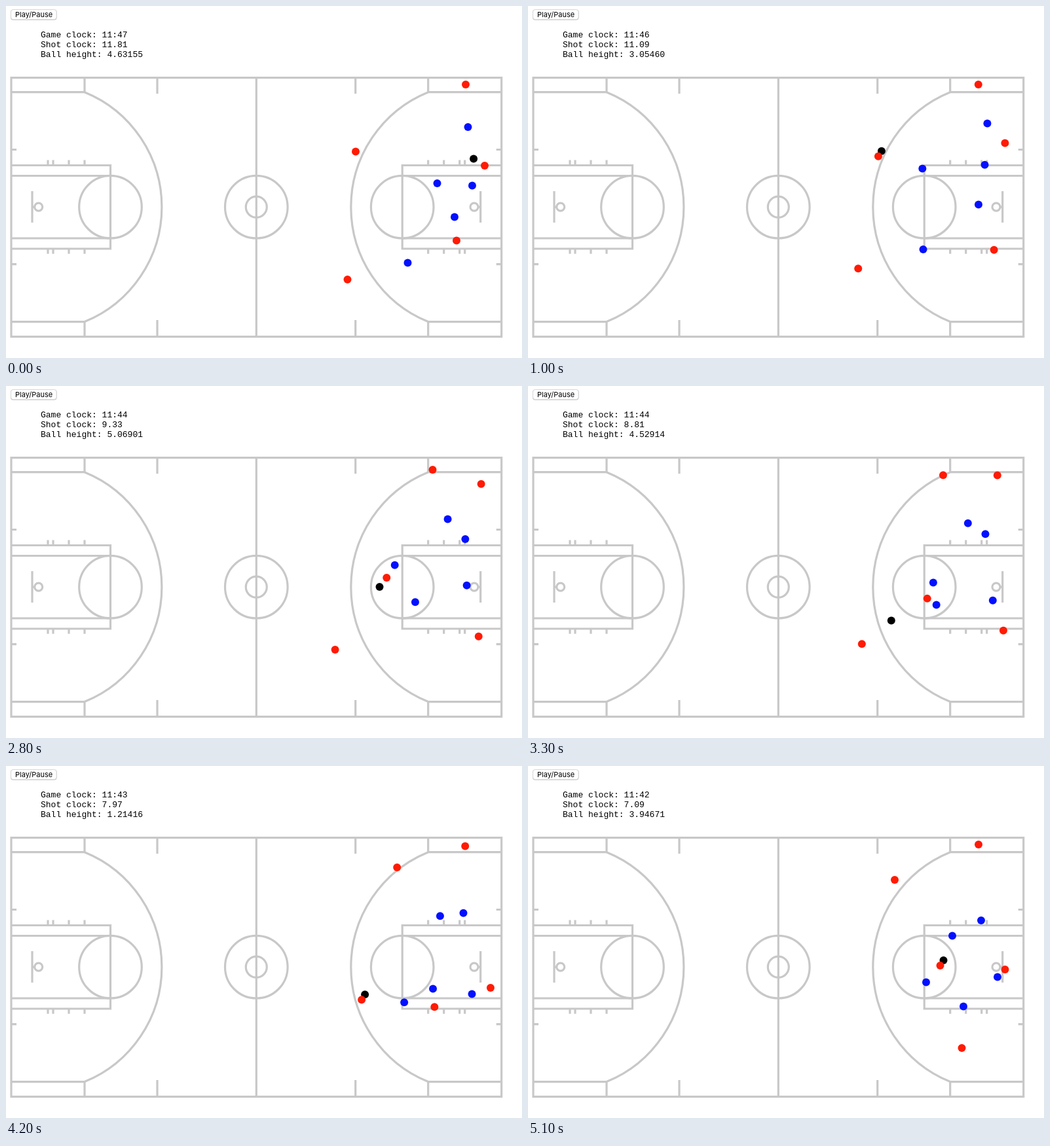
These frames come from a looping animation (788 px wide and 538 px high, 5.2 s). An HTML page:

```html
<!DOCTYPE html>
<html lang="en">
<head>
<meta charset="utf-8">
<title>Court tracking</title>
<style>
  html, body { margin: 0; width: 100%; height: 100%; overflow: hidden; background: #fff; }
  svg { display: block; width: 788px; height: 538px; }
  .court { fill: none; stroke: #c8c8c8; stroke-width: 3.2; }
  .button { font: 11px Inter, sans-serif; }
  .stats { font: 13px "Liberation Mono", "Courier New", monospace; white-space: pre; }
</style>
</head>
<body>
<svg viewBox="0 0 788 538">
  <g class="button">
    <rect x="7" y="5.6" width="70.5" height="16" rx="4" fill="#bdbdbd"/>
    <rect x="7.5" y="5.5" width="69.5" height="15" rx="3.5" fill="#fff" stroke="#d4d4d4" stroke-width=".8"/>
    <text x="14" y="17">Play/Pause</text>
  </g>
  <g class="stats">
    <text id="game" x="53" y="47.5"></text>
    <text id="shot" x="53" y="62.5"></text>
    <text id="height" x="53" y="77.5"></text>
  </g>
  <g class="court">
    <g id="half">
      <path d="M8 131.7H120V110M8 482.6H120V505M231 110V134M231 480V505"/>
      <path d="M120 131.7A189.5 189.5 0 0 1 120 482.6"/>
      <path d="M8 243.5H159.5V371H8M8 259.5H159.5M8 355H159.5"/>
      <g id="marks"><path d="M64 235.5v7.5m8 0v-7.5m24 0v7.5m24 0v-7.5M8 219.5h8"/></g>
      <use href="#marks" transform="matrix(1 0 0 -1 0 614.2)"/>
      <path d="M40 283V331M40 307.2H43.5"/>
      <circle cx="159.5" cy="307.2" r="47.8"/>
      <circle cx="49.7" cy="307.2" r="6"/>
    </g>
    <use href="#half" transform="matrix(-1 0 0 1 764.7 0)"/>
    <rect x="8" y="109.6" width="748.7" height="395.8"/>
    <path d="M382.3 110V505"/>
    <circle cx="382.3" cy="307.2" r="47.8"/>
    <circle cx="382.3" cy="307.2" r="16"/>
  </g>
  <g id="dots"></g>
</svg>
<script>
const LOOP = 5.2, STEP = 0.1, END = LOOP - STEP;
const $ = id => document.getElementById(id);
const clamp = u => Math.min(1, Math.max(0, u));
const mix = (a, b, u) => a + (b - a) * u;

// Catmull-Rom curve through values spread evenly over the play.
function spline(values) {
  const n = values.length - 1;
  const slope = i => i === 0 ? values[1] - values[0]
    : i === n ? values[n] - values[n - 1]
    : (values[i + 1] - values[i - 1]) / 2;
  return t => {
    const pos = t / END * n, i = Math.min(n - 1, Math.floor(pos));
    const u = pos - i, v = 1 - u;
    return v * v * ((1 + 2 * u) * values[i] + u * slope(i)) +
           u * u * ((1 + 2 * v) * values[i + 1] - v * slope(i + 1));
  };
}

function addDot(color, at) {
  const el = document.createElementNS('http://www.w3.org/2000/svg', 'circle');
  el.setAttribute('r', 6);
  el.setAttribute('fill', color);
  $('dots').append(el);
  return { el, at };
}

// A run is a few waypoints, reached at equal intervals.
function run(...points) {
  const x = spline(points.map(p => p[0])), y = spline(points.map(p => p[1]));
  return t => [x(t), y(t)];
}

const wing = run([702, 120], [659, 125], [560, 174]);
const guard = run([534, 222.5], [535, 230], [543, 237], [596, 312], [651, 361], [662.5, 431]);
const passer = run([731, 244], [728, 200], [728.5, 157], [707, 126], [688, 120]);
const center = run([688, 358.5], [712, 373], [723.5, 380], [722.5, 380], [740, 343], [728.5, 311]);
const driver = run([521.5, 418], [504, 401], [500, 402], [506, 400], [535, 363], [629.5, 305]);

const defenders = [
  run([705.5, 185], [699, 180], [677, 200], [668, 219], [648, 259.5]),
  run([658.5, 271], [592, 246], [586, 264], [643, 327], [665, 367.5]),
  run([712, 274.5], [697.5, 242.5], [709, 250], [699, 229], [699, 224], [692, 236]),
  run([685, 322.5], [688, 303], [688, 269], [708, 318], [711, 349], [717, 322.5]),
  run([613.5, 392.5], [603.5, 371.5], [614, 349], [626, 329], [609, 362], [608, 330.5])
];

// The ball stays beside its holder and goes passer > guard > driver.
function ball(t) {
  const first = clamp((t + 0.1) / 0.9), second = clamp((t - 2.55) / 1.25);
  const [a, b, c] = [passer(t), guard(t), driver(t)];
  const along = i => mix(mix(a[i], b[i], first), c[i], second);
  return [along(0) + 5, along(1) - 8];
}

const dots = [
  addDot('#000', ball),
  ...defenders.map(at => addDot('#0310ff', at)),
  ...[wing, guard, passer, center, driver].map(at => addDot('#ff1b04', at))
];
const height = spline([4.63155, 3.03985, 3.19486, 5.2, 1.2, 3.94671]);

function draw(t) {
  for (const { el, at } of dots) {
    const [x, y] = at(t);
    el.setAttribute('cx', x);
    el.setAttribute('cy', y);
  }
  // The clock starts slowly, then runs at 0.04 s per sample.
  const sample = Math.round(Math.max(t * 10, (t - 0.245) / 0.041));
  const shot = 11.81 - 0.04 * sample;
  $('game').textContent = 'Game clock: 11:' + (36 + Math.floor(shot - 0.75));
  $('shot').textContent = 'Shot clock: ' + shot.toFixed(2);
  $('height').textContent = 'Ball height: ' + height(t).toFixed(5);
}

const start = performance.now();
function tick() {
  const t = (performance.now() - start) / 1000 % LOOP;
  draw(Math.floor(t / STEP + 1e-6) * STEP);
  requestAnimationFrame(tick);
}
tick();
</script>
</body>
</html>
```
